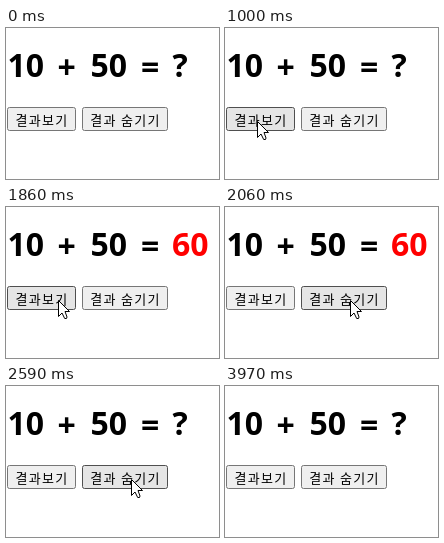
An HTML page with a canvas for the animation above (4630 ms loop, 213x151 px).

```html
<!DOCTYPE html>
<html lang="ko">
<head>
<meta charset="utf-8">
<title>10 + 50</title>
<style>
  html, body { margin: 0; width: 100%; height: 100%; overflow: hidden; background: #fff; }
  canvas { display: block; }
</style>
</head>
<body>
<canvas id="stage" width="213" height="151"></canvas>
<script>
const ctx = document.getElementById('stage').getContext('2d');
const LOOP = 4630;

const SHOW = { label: '결과보기', x: 1, y: 79, w: 69, h: 24, press: [1130, 1200] };
const HIDE = { label: '결과 숨기기', x: 76, y: 79, w: 86, h: 24, press: [2390, 2590] };

const STYLES = {
  normal: { fill: '#efefef', line: '#767676' },
  hover: { fill: '#e5e5e5', line: '#4f4f4f' },
  active: { fill: '#f5f5f5', line: '#8d8d8d' }
};

// Pointer steps: time, x, y; a bare time means the pointer is off stage.
const POINTER = [
  [0],
  [660, 46, 143], [730, 42, 123], [800, 38, 108], [870, 35, 99],
  [1000, 32, 93],
  [1860, 52, 93], [1930, 86, 94], [2000, 114, 94], [2060, 125, 93],
  [3760, 128, 96], [3830, 140, 114], [3900, 154, 138],
  [3970]
];

const ARROW = new Path2D(
  'M.5 .5V16.5L4 13L6.7 18.5H8.5L9 17L7 11.5H11.5Z');

function within(t, [from, to]) {
  return t >= from && t < to;
}

function pointerAt(t) {
  const [, x, y] = POINTER.findLast(step => step[0] <= t);
  return x === undefined ? null : { x, y };
}

function contains(b, p) {
  return p && p.x >= b.x && p.x < b.x + b.w && p.y >= b.y && p.y < b.y + b.h;
}

function drawText(text, x, y, color = '#000') {
  ctx.fillStyle = color;
  ctx.fillText(text, x, y);
}

function headingFont(weight) {
  ctx.font = `${weight} 32px "Noto Sans", "Open Sans", sans-serif`;
}

function drawHeading(solved) {
  ctx.textAlign = 'left';
  ctx.letterSpacing = '0px';
  headingFont(700);
  drawText('10', 1.5, 49);
  drawText('50', 84.5, 49);
  if (solved) drawText('60', 166, 49, '#f00');
  else drawText('?', 166.5, 49);
  headingFont(600);
  drawText('+', 51.5, 51);
  drawText('=', 135, 51);
}

function drawButton(b, t, pointer) {
  const state = within(t, b.press) ? 'active' : contains(b, pointer) ? 'hover' : 'normal';
  ctx.beginPath();
  ctx.roundRect(b.x + .5, b.y + .5, b.w - 1, b.h - 1, 2);
  ctx.fillStyle = STYLES[state].fill;
  ctx.fill();
  ctx.strokeStyle = STYLES[state].line;
  ctx.stroke();
  ctx.font = '300 13px "Noto Sans CJK KR", "Noto Sans CJK", sans-serif';
  ctx.letterSpacing = '1.3px';
  ctx.textAlign = 'center';
  drawText(b.label, b.x + b.w / 2 + .5, 96.5);
}

function drawPointer({ x, y }) {
  ctx.save();
  ctx.translate(x, y);
  ctx.fillStyle = '#fff';
  ctx.fill(ARROW);
  ctx.strokeStyle = '#000';
  ctx.stroke(ARROW);
  ctx.restore();
}

function draw(t) {
  const pointer = pointerAt(t);
  ctx.fillStyle = '#fff';
  ctx.fillRect(0, 0, 213, 151);
  ctx.lineWidth = 1;
  drawHeading(within(t, [SHOW.press[1], HIDE.press[1]]));
  drawButton(SHOW, t, pointer);
  drawButton(HIDE, t, pointer);
  if (pointer) drawPointer(pointer);
}

const start = performance.now();
function tick() {
  draw((performance.now() - start) % LOOP);
  requestAnimationFrame(tick);
}
tick();
</script>
</body>
</html>
```
